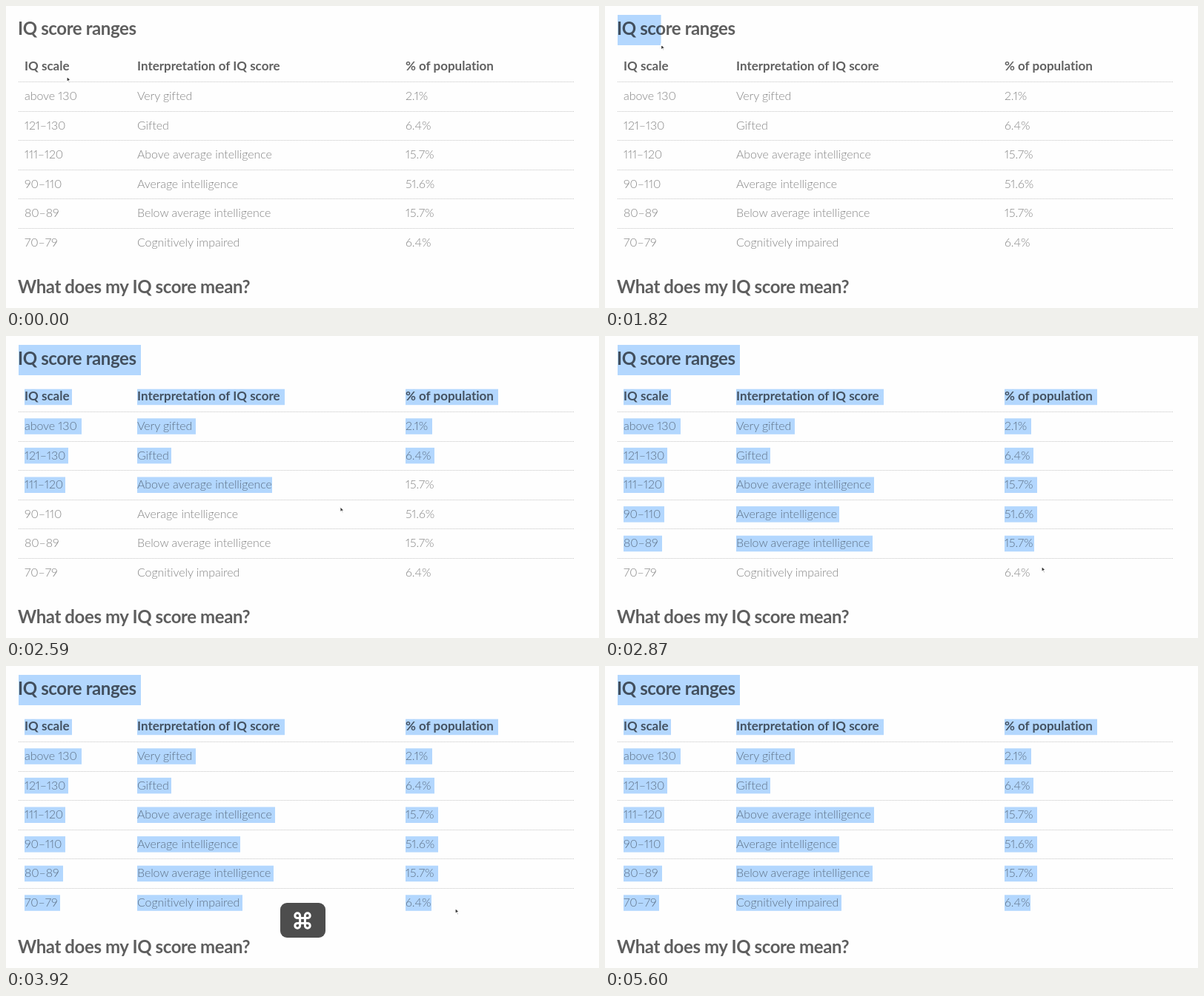
Write an HTML page that moves like this. It is 800x408 px and loops after 6020 ms.

```html
<!DOCTYPE html>
<html lang="en">
<head>
<meta charset="utf-8">
<title>IQ score ranges</title>
<style>
html, body { margin: 0; width: 100%; height: 100%; overflow: hidden; background: #fefefe; }
svg { display: block; font-family: Lato, "Open Sans", sans-serif; font-variant: no-common-ligatures proportional-nums; }
.title { font-size: 24px; font-weight: 700; letter-spacing: -.4px; fill: #000; fill-opacity: .63; }
.head { font-size: 17px; font-weight: 700; fill: #000; fill-opacity: .62; }
.cell { font-size: 16px; font-weight: 300; letter-spacing: -.08px; fill: #000; fill-opacity: .48; }
.rule { stroke: #c6c6c6; stroke-dasharray: 1 1; }
.mark { fill: #b3d7fe; }
</style>
</head>
<body>
<svg width="800" height="408" viewBox="0 0 800 408">
  <g id="marks"></g>
  <g id="table"></g>
  <text class="title" x="16" y="39">IQ score ranges</text>
  <text class="title" x="16" y="388">What does my IQ score mean?</text>
  <g id="key">
    <rect id="cap" y="320" height="47" rx="9" fill="#4d4d4d"/>
    <path id="cmd" d="M-1-2V2A1 1 0 1 1-2 1H2A1 1 0 1 1 1 2V-2A1 1 0 1 1 2-1H-2A1 1 0 1 1-1-2Z"
      fill="none" stroke="#fff" stroke-width=".88"/>
    <text id="letter" x="403" y="355" fill="#fff" font-family="Inter, sans-serif" font-size="30" font-weight="600">C</text>
  </g>
  <path id="cursor" d="M0 0V7.8L1.8 6.2L3 9L4.4 8.4L3.2 5.7H5.5Z" fill="#333"
    stroke="#fff" stroke-width="1.2"/>
</svg>
<script>
const LOOP = 6020, STEP = 70, ROW = 39.6;
const columns = [25, 177, 539];
// Each row: three texts, then the right edges of their highlights
const rows = [
  ["IQ scale", "Interpretation of IQ score", "% of population", 89, 376, 664],
  ["above 130", "Very gifted", "2.1%", 102, 256, 575],
  ["121–130", "Gifted", "6.4%", 84, 223, 578],
  ["111–120", "Above average intelligence", "15.7%", 80, 363, 583],
  ["90–110", "Average intelligence", "51.6%", 80, 316, 583],
  ["80–89", "Below average intelligence", "15.7%", 77, 361, 583],
  ["70–79", "Cognitively impaired", "6.4%", 73, 319, 578]
];
// Cursor stops: time, x, y, easing into the stop
const inOut = p => p * p * (3 - 2 * p);
const stops = [
  [0, 82, 95],
  [700, 15, 29, inOut],
  [980, 15, 29, inOut],
  [1260, 15, 27, inOut],
  [1610, 15, 27, inOut],
  [2380, 303, 144, p => p ** 1.2],
  [2870, 589, 311, p => 1 - (1 - p) ** 1.3],
  [3500, 606, 327, p => 1 - (1 - p) ** 2],
  [4760, 606, 327, inOut],
  [4830, 592, 335, inOut]
];

const $ = id => document.getElementById(id);
function add(parent, tag, attrs, text = "") {
  const el = document.createElementNS("http://www.w3.org/2000/svg", tag);
  for (const name in attrs) el.setAttribute(name, attrs[name]);
  el.textContent = text;
  return parent.appendChild(el);
}

const title = add($("marks"), "rect", { class: "mark", x: 17, y: 12, height: 41 });
const marks = [];
rows.forEach((row, r) => {
  columns.forEach((x, c) => {
    const mark = add($("marks"), "rect", { class: "mark", x, y: 71.7 + ROW * r, height: 21.5 });
    marks.push({ mark, width: row[c + 3] - x });
    add($("table"), "text", { class: r ? "cell" : "head", x, y: 87.3 + ROW * r }, row[c]);
  });
  if (r) {
    const y = Math.round(102 + ROW * (r - 1)) + .5;
    add($("table"), "line", { class: "rule", x1: 17, x2: 767, y1: y, y2: y });
  }
});

function cursorAt(t) {
  const i = stops.findIndex(s => s[0] > t);
  if (i < 0) return stops.at(-1).slice(1, 3);
  const [t0, x0, y0] = stops[i - 1], [t1, x1, y1, ease] = stops[i];
  const p = ease((t - t0) / (t1 - t0));
  return [x0 + (x1 - x0) * p, y0 + (y1 - y0) * p];
}

function select(t, x, y) {
  const dragging = t >= 1680;
  const r = Math.floor((y - 13 - 62.8) / ROW);
  const c = columns.findLastIndex(left => x >= left);
  const count = !dragging || r < 0 ? 0 : r * 3 + c + 1;
  const reach = y > 62 ? 165 : Math.max(0, Math.min(165, x - 17));
  title.setAttribute("width", dragging ? reach : 0);
  marks.forEach(({ mark, width }, i) =>
    mark.setAttribute("width", i >= count ? 0 : i === count - 1 ? width - 4 : width));
}

function showKey(t) {
  const both = t >= 4200;
  $("key").setAttribute("opacity", t < 3920 ? 0 : Math.max(0, Math.min(1, 1 - (t - 5110) / 350)));
  $("cap").setAttribute("x", both ? 360 : 370);
  $("cap").setAttribute("width", both ? 81 : 61);
  $("cmd").setAttribute("transform", `translate(${both ? 389.5 : 400} 344) scale(3.4)`);
  $("letter").setAttribute("opacity", both ? 1 : 0);
}

function draw(now) {
  const t = Math.floor(now % LOOP / STEP) * STEP;
  const [x, y] = cursorAt(t);
  // After the copy the pointer slips aside and disappears
  select(t, ...cursorAt(Math.min(t, 4760)));
  showKey(t);
  $("cursor").setAttribute("transform", `translate(${x} ${y})`);
  $("cursor").setAttribute("opacity", t < 4900 ? 1 : 0);
}

const start = performance.now();
function tick() {
  draw(performance.now() - start);
  requestAnimationFrame(tick);
}
tick();
</script>
</body>
</html>
```
